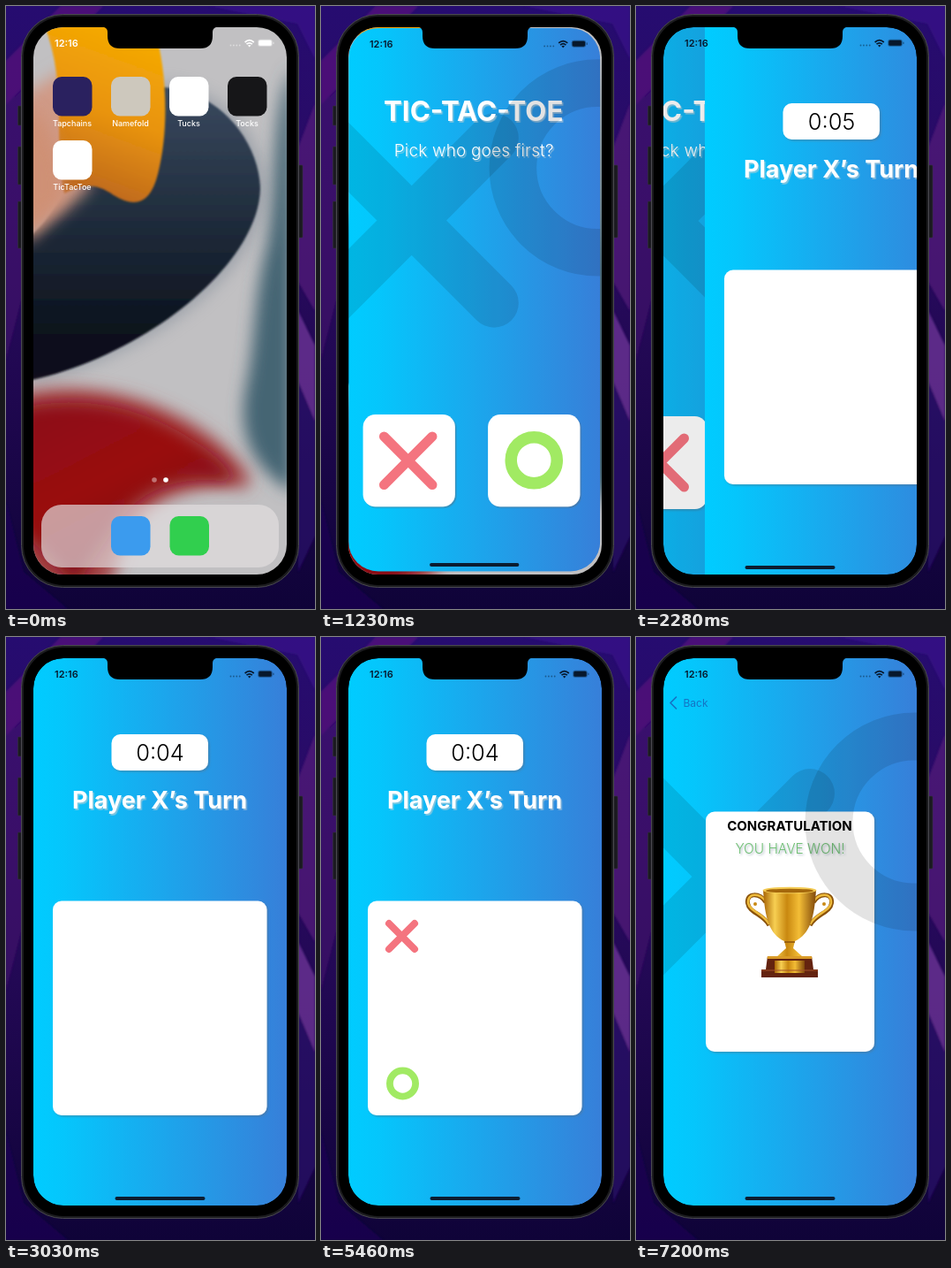
An HTML page that plays this animation: 350 px wide and 682 px high, repeating every 8 s.

```html
<!DOCTYPE html>
<html lang="en">
<head>
<meta charset="utf-8">
<title>Tic-tac-toe on a phone</title>
<style>
  html, body { margin: 0; width: 100%; height: 100%; overflow: hidden; background: #14063f; }
  svg { display: block; width: 100vw; height: 100vh; }
  text { font-family: Inter, "Open Sans", sans-serif; }
  .mid { text-anchor: middle; }
  .bold { font-weight: 700; }
  .light { font-weight: 300; }
  .label { font-size: 9px; font-weight: 500; fill: #fff; text-anchor: middle; }
  .x { stroke: #f4747f; fill: none; stroke-linecap: round; }
  .o { stroke: #a1ea63; fill: none; }
  .mark { stroke: #000; stroke-opacity: .11; fill: none; stroke-linecap: round; }
  .lift { filter: url(#lift); }
  .soft { filter: url(#soft); }
</style>
</head>
<body>
<svg viewBox="0 0 350 682" preserveAspectRatio="none">
  <defs>
    <linearGradient id="desk" x1="0" y1="0" x2="0" y2="1">
      <stop offset="0" stop-color="#260c70"/>
      <stop offset=".35" stop-color="#2a0b62"/>
      <stop offset=".6" stop-color="#210852"/>
      <stop offset="1" stop-color="#0f0338"/>
    </linearGradient>
    <linearGradient id="sky">
      <stop offset="0" stop-color="#00ccff"/>
      <stop offset=".12" stop-color="#05c6fc"/>
      <stop offset="1" stop-color="#377fd9"/>
    </linearGradient>
    <linearGradient id="navy" x1="0" y1="0" x2="0" y2="1">
      <stop offset="0" stop-color="#3a4a60"/>
      <stop offset=".5" stop-color="#1d2938"/>
      <stop offset=".85" stop-color="#0b111c"/>
    </linearGradient>
    <linearGradient id="amber" x1=".6" y1="0" x2=".35" y2="1">
      <stop offset="0" stop-color="#f6ab02"/>
      <stop offset=".5" stop-color="#e8930e"/>
      <stop offset="1" stop-color="#b9631f"/>
    </linearGradient>
    <linearGradient id="red" x1=".1" y1="0" x2=".7" y2="1">
      <stop offset="0" stop-color="#8c1015"/>
      <stop offset=".45" stop-color="#9a0a10"/>
      <stop offset="1" stop-color="#6e1618"/>
    </linearGradient>
    <linearGradient id="gold">
      <stop offset="0" stop-color="#a86405"/>
      <stop offset=".22" stop-color="#f7cf52"/>
      <stop offset=".45" stop-color="#c98810"/>
      <stop offset=".68" stop-color="#f3bd36"/>
      <stop offset="1" stop-color="#80480a"/>
    </linearGradient>
    <filter id="lift" x="-20%" y="-20%" width="140%" height="150%">
      <feDropShadow dx="1.5" dy="1.5" stdDeviation=".8" flood-color="#557085" flood-opacity=".5"/>
    </filter>
    <filter id="glow" x="-10%" y="-30%" width="120%" height="170%">
      <feDropShadow dx="1.5" dy="1.8" stdDeviation=".5" flood-color="#c9d2d4" flood-opacity=".6"/>
    </filter>
    <filter id="soft" x="-40%" y="-40%" width="180%" height="180%"><feGaussianBlur stdDeviation="9"/></filter>
    <filter id="edge" x="-20%" y="-20%" width="140%" height="140%"><feGaussianBlur stdDeviation="1"/></filter>
    <clipPath id="screen"><rect x="31" y="24" width="287" height="619" rx="34"/></clipPath>
    <clipPath id="window"><rect id="frame" x="31" y="24" width="287" height="619" rx="34"/></clipPath>

    <g id="status" fill="currentColor">
      <text x="55" y="46" font-size="11" font-weight="600">12:16</text>
      <g opacity=".45">
        <circle cx="254.5" cy="44.5" r=".9"/><circle cx="257.9" cy="44.5" r=".9"/>
        <circle cx="261.3" cy="44.5" r=".9"/><circle cx="264.7" cy="44.5" r=".9"/>
      </g>
      <path d="M270.6 41Q275.7 36.400 280.800 41M272.500 43.200Q275.700 40.400 278.900 43.200" fill="none" stroke="currentColor" stroke-width="1.7"/>
      <path d="M273.900 44.600Q275.700 43.200 277.500 44.600L275.700 46.500Z"/>
      <rect x="285.300" y="37.800" width="16.400" height="8" rx="2.500" opacity=".4"/>
      <rect x="286.300" y="38.800" width="14.400" height="6" rx="1.600"/>
      <rect x="302.300" y="40.400" width="1.200" height="2.800" rx=".6" opacity=".5"/>
    </g>
    <path id="bigX" class="mark" d="M9 149L197 337M9 337L197 149" stroke-width="56"/>
    <circle id="bigO" class="mark" cx="315" cy="183" r="96.500" stroke-width="54"/>
    <rect id="back" x="31" y="24" width="287" height="619" fill="url(#sky)"/>
    <path id="smallX" class="x" d="M-14.500 -14.500L14.500 14.500M-14.500 14.500L14.500 -14.500" stroke-width="8"/>
    <g id="handle">
      <path d="M147 300C140 289 125 289 126.500 301C128 312 144 313 151 326" fill="none" stroke="#8a520a" stroke-width="5"/>
      <path d="M147 299C140 289 126 289 127 301C129 311 144 312 151 325" fill="none" stroke="#eebb3c" stroke-width="2.600"/>
      <circle cx="135" cy="302" r="2" fill="#c98a16"/>
    </g>
  </defs>

  <!-- desktop -->
  <rect width="350" height="682" fill="url(#desk)"/>
  <g filter="url(#edge)">
    <path d="M0 62L62 0H110L0 112Z" fill="#59157c" opacity=".7"/>
    <path d="M0 112L18 95V330L0 400Z" fill="#471070" opacity=".55"/>
    <path d="M230 0H350V60L330 20Z" fill="#3f1590" opacity=".6"/>
    <path d="M331 160L350 110V345L331 312Z" fill="#531a78" opacity=".75"/>
    <path d="M331 345L350 384V470L331 425Z" fill="#70369a" opacity=".75"/>
    <path d="M331 425L350 470V600L331 640Z" fill="#2a0a6c" opacity=".7"/>
    <path d="M0 560L20 640L70 682H0Z" fill="#1b0656" opacity=".7"/>
  </g>

  <!-- phone -->
  <g fill="#1b1a20" stroke="#37343d" stroke-width=".6">
    <rect x="13.500" y="113" width="5" height="22" rx="1"/>
    <rect x="13.500" y="159" width="5" height="43" rx="1"/>
    <rect x="13.500" y="221" width="5" height="53" rx="1"/>
    <rect x="331" y="180" width="5" height="82" rx="1"/>
  </g>
  <rect x="17.500" y="9.500" width="314" height="648" rx="47" fill="#1c1c1f" stroke="#4b4a50" stroke-width="1"/>
  <rect x="20" y="12" width="309" height="643" rx="45" fill="#000"/>

  <g clip-path="url(#screen)">
    <g id="home">
      <g id="paper">
        <rect x="31" y="24" width="287" height="619" fill="#c1c0c2"/>
        <path class="soft" d="M325 70C300 110 308 210 296 270C280 330 283 380 272 430C262 480 275 520 325 550Z" fill="#456573"/>
        <path d="M25 250C90 200 120 90 180 88C250 92 292 155 294 205C292 300 160 398 25 426Z" fill="#7d8794" filter="url(#soft)" opacity=".55"/>
        <path d="M25 262C70 230 110 100 180 92C245 98 286 155 288 205C288 290 160 395 25 424Z" fill="url(#navy)" filter="url(#edge)"/>
        <path class="soft" d="M20 100L70 70L95 205C75 225 50 245 20 268Z" fill="#d09a86"/>
        <path d="M42 18H166C183 70 185 140 172 190C164 222 148 230 122 214C100 199 86 202 66 212C52 160 72 90 42 18Z" fill="url(#amber)" filter="url(#edge)"/>
        <path class="soft" d="M20 110C50 125 62 165 66 215L20 265Z" fill="#cf8f72" opacity=".85"/>
        <path class="soft" d="M15 438C100 418 190 450 240 492C270 520 284 535 272 546C230 538 170 550 146 588C130 612 125 640 115 660H15Z" fill="#a44a4b"/>
        <path class="soft" d="M15 455C100 436 170 460 225 500C250 520 262 532 252 538C200 530 155 545 130 580C110 610 90 640 78 655L15 590Z" fill="url(#red)"/>
      </g>
      <g id="icons">
        <rect x="40" y="564" width="269" height="71" rx="23" fill="#e4dfe0" opacity=".68"/>
        <rect x="53" y="80" width="44.500" height="44.500" rx="10" fill="#2a215f"/>
        <rect x="119" y="80" width="44.500" height="44.500" rx="10" fill="#cdc8bd"/>
        <rect x="185" y="80" width="44.500" height="44.500" rx="10" fill="#fff"/>
        <rect x="251" y="80" width="44.500" height="44.500" rx="10" fill="#161618"/>
        <rect id="tile" x="53" y="152" width="44.500" height="44.500" rx="10" fill="#fff"/>
        <rect x="119" y="577" width="44.500" height="44.500" rx="10" fill="#3b9bee"/>
        <rect x="185.500" y="577" width="44.500" height="44.500" rx="10" fill="#31cf4e"/>
        <text class="label" x="75" y="136">Tapchains</text>
        <text class="label" x="141" y="136">Namefold</text>
        <text class="label" x="207" y="136">Tucks</text>
        <text class="label" x="273" y="136">Tocks</text>
        <text class="label" x="75" y="208">TicTacToe</text>
        <circle cx="168" cy="536" r="2.800" fill="#fff" opacity=".4"/>
        <circle cx="181" cy="536" r="2.800" fill="#fff"/>
      </g>
      <use href="#status" color="#fff"/>
    </g>

    <g id="app" clip-path="url(#window)">
      <g id="content">
        <g id="start">
          <use href="#back"/>
          <use href="#bigX"/>
          <g fill="#fff" filter="url(#glow)">
            <text class="mid bold" x="173.500" y="129.500" font-size="31.500">TIC-TAC-TOE</text>
            <text class="mid light" x="174" y="170" font-size="19" letter-spacing=".25">Pick who goes first?</text>
          </g>
          <use href="#bigO"/>
          <rect class="lift" x="47.500" y="464" width="105" height="105" rx="14" fill="#fff"/>
          <rect class="lift" x="190" y="464" width="105" height="105" rx="14" fill="#fff"/>
          <path class="x" d="M71.500 489L126.500 544M126.500 489L71.500 544" stroke-width="11"/>
          <circle class="o" cx="242.500" cy="516" r="26.200" stroke-width="13.600"/>
          <rect class="shade" x="31" y="24" width="287" height="619"/>
        </g>
        <g id="game">
          <use href="#back"/>
          <rect class="lift" x="119.500" y="110" width="109.500" height="41" rx="10" fill="#fff"/>
          <text id="timer" class="mid light" x="174.500" y="140" font-size="25.500">0:05</text>
          <text class="mid bold" x="174" y="193.500" font-size="27" fill="#fff" filter="url(#glow)">Player X’s Turn</text>
          <rect class="lift" x="53" y="298.500" width="242.500" height="242.500" rx="10" fill="#fff"/>
          <g id="round1">
            <use href="#smallX" x="91.500" y="338.500"/>
            <circle class="o" cx="92.500" cy="505" r="14.600" stroke-width="7.800"/>
          </g>
          <use id="round2" href="#smallX" x="174.500" y="421.500"/>
          <rect class="shade" x="31" y="24" width="287" height="619"/>
        </g>
        <g id="win">
          <use href="#back"/>
          <use href="#bigX" y="28"/>
          <path d="M45.500 68L39 74.500L45.500 81" fill="none" stroke="#1573c4" stroke-width="1.700" stroke-linecap="round" stroke-linejoin="round"/>
          <text x="53.500" y="79" font-size="12" fill="#1573c4">Back</text>
          <rect class="lift" x="79" y="197.500" width="191" height="271.500" rx="10" fill="#fff"/>
          <text class="mid bold" x="174" y="219" font-size="15">CONGRATULATION</text>
          <text class="mid light" x="174.500" y="245" font-size="15.400" fill="#6fbf73" filter="url(#lift)">YOU HAVE WON!</text>
          <use href="#handle"/>
          <use href="#handle" transform="translate(348 0) scale(-1 1)"/>
          <path d="M144 286C146 318 151 336 168 344L170 352L160 361H188L178 352L180 344C197 336 202 318 204 286Z" fill="url(#gold)"/>
          <ellipse cx="174" cy="286.500" rx="30.500" ry="3.800" fill="#f4cc55"/>
          <ellipse cx="174" cy="287" rx="27" ry="2.300" fill="#a5680c"/>
          <path d="M168 345H180" stroke="#8a520a" stroke-width="1.500"/>
          <path d="M149 361H199L201 376H206V385H142V376H147Z" fill="#64230f"/>
          <path d="M149 361H199L199.500 364H148.500Z" fill="#d99a28"/>
          <rect x="157" y="366" width="34" height="14" fill="url(#gold)"/>
          <path d="M142 377H206" stroke="#a5522a" stroke-width="1"/>
          <use href="#bigO" y="26"/>
        </g>
        <use href="#status" color="#07182c"/>
        <rect x="123.500" y="633" width="102" height="4" rx="2" fill="#0b1c30"/>
      </g>
      <rect id="splash" x="31" y="24" width="287" height="619" fill="#fff"/>
    </g>
  </g>

  <!-- notch -->
  <path d="M109 23.500H240C236 24 234 26 234 30V34Q234 48 220 48H129Q115 48 115 34V30C115 26 113 24 109 23.500Z" fill="#000"/>
</svg>
<script>
const LOOP = 8000, OPEN = 720, PUSH_GAME = 2113, PUSH_WIN = 6703;
const WIDTH = 287, PARALLAX = 0.3, DIM = 0.09;
const $ = id => document.getElementById(id);
const el = {};
for (const id of ["frame", "home", "paper", "icons", "tile", "app", "content", "start", "game", "win",
  "timer", "round1", "round2", "splash"]) el[id] = $(id);

const set = (node, attrs) => { for (const k in attrs) node.setAttribute(k, attrs[k]); };
const show = (node, on) => { node.style.display = on ? "" : "none"; };
const mix = (a, b, p) => a + (b - a) * p;
const clamp = v => Math.max(0, Math.min(1, v));

// Critically damped spring from 0 to 1; rate is per millisecond.
function spring(ms, rate) {
  const x = ms * rate;
  return x <= 0 ? 0 : x > 9.3 ? 1 : 1 - (1 + x) * Math.exp(-x);
}

// Each entry: time from which the countdown shows this value.
const ticks = [[0, 5], [3030, 4], [3930, 3], [4560, 5], [5460, 4], [5580, 5], [6480, 4]];

function zoom(node, s) {
  set(node, { transform: `translate(174.5 333.5) scale(${s}) translate(-174.5 -333.5)` });
}

function openApp(p) {
  const x = mix(53, 31, p), y = mix(152, 24, p);
  const width = mix(44.5, WIDTH, p), height = mix(44.5, 619, p);
  set(el.frame, { x, y, width, height, rx: mix(10, 34, p) });
  set(el.splash, { x, y, width, height, opacity: clamp(1 - p * 2.5) });
  set(el.content, { transform: `translate(${x} ${y}) scale(${width / WIDTH}) translate(-31 -24)` });
  zoom(el.paper, mix(1, 1.1, p));
  zoom(el.icons, mix(1, 1.3, p));
  set(el.icons, { opacity: clamp(1 - p * 1.4) });
  show(el.app, p > 0);
  show(el.tile, p === 0);
  show(el.home, p < 1);
}

function push(from, to, p) {
  show(from, p < 1);
  show(to, p > 0);
  set(to, { transform: `translate(${WIDTH * (1 - p)} 0)` });
  const shift = -WIDTH * PARALLAX * p;
  if (p > 0) set(from, { transform: `translate(${shift} 0)` });
  else if (from === el.start) set(from, { transform: "translate(0 0)" });
  set(from.querySelector(".shade"), { opacity: DIM * p });
}

function draw(t) {
  openApp(spring(t - OPEN, 0.0135));
  const toGame = spring(t - PUSH_GAME, 0.0194);
  const toWin = spring(t - PUSH_WIN, 0.0194);
  push(el.start, el.game, toGame);
  push(el.game, el.win, toWin);
  show(el.game, toGame > 0 && toWin < 1);
  const value = ticks.filter(([from]) => t >= from).pop()[1];
  el.timer.textContent = "0:0" + value;
  show(el.round1, t >= 4560);
  show(el.round2, t >= 5580);
}

const began = performance.now();
function tick() {
  draw((performance.now() - began) % LOOP);
  requestAnimationFrame(tick);
}
tick();
</script>
</body>
</html>
```
